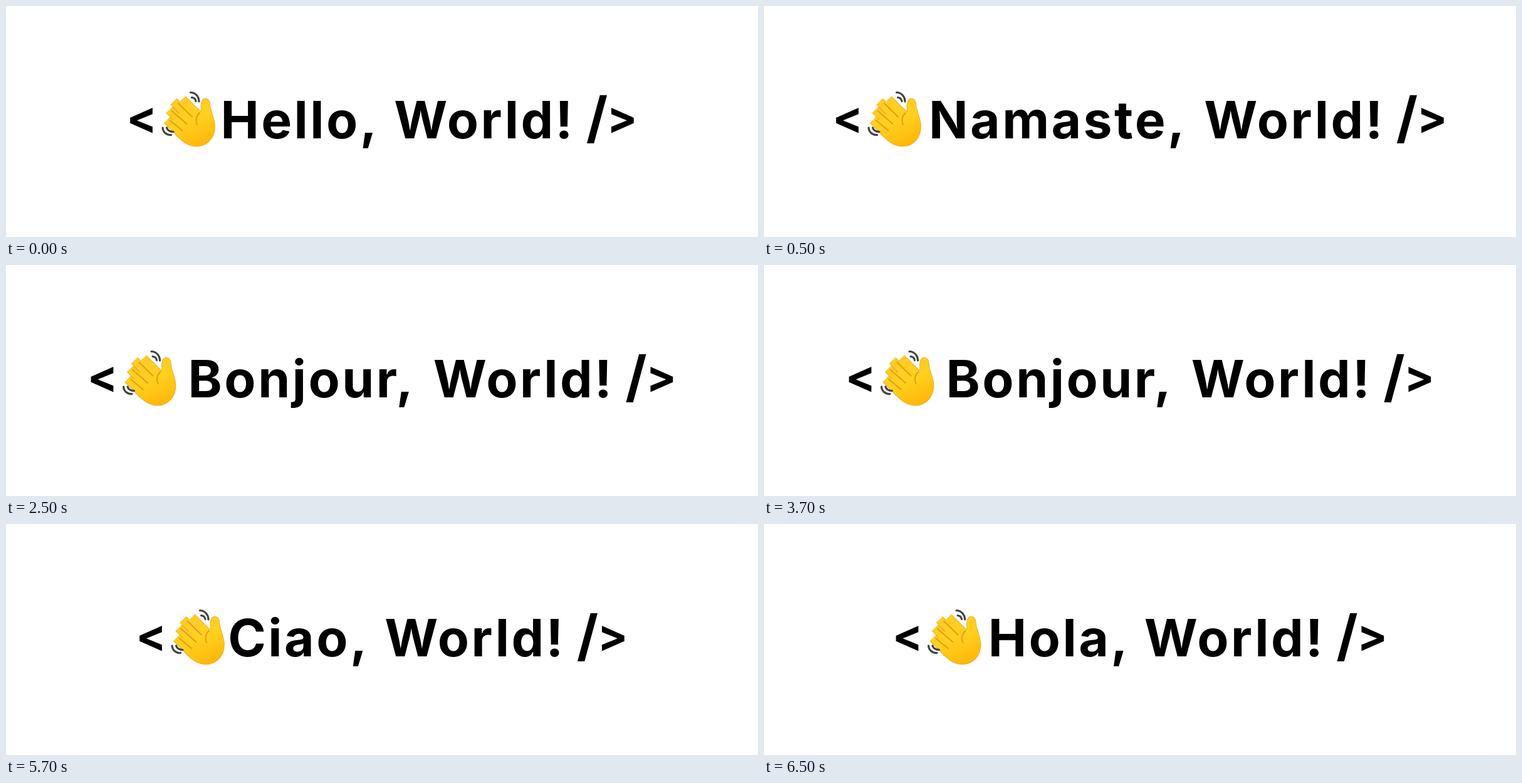
Write an HTML page that moves like this. It is 1200 px wide and 370 px high and loops after 8000 ms.

```html
<!DOCTYPE html>
<html lang="en">
<head>
<meta charset="utf-8">
<title>Hello, World!</title>
<style>
  html, body { margin: 0; width: 100%; height: 100%; overflow: hidden; background: #fff; }
  svg { display: block; width: 1200px; height: 370px; }
  text { font: 700 82px Inter, "Open Sans", sans-serif; text-anchor: middle; fill: #000; }
  .word { letter-spacing: 3.5px; font-optical-sizing: none; }
  .hand path { stroke-linecap: round; stroke-linejoin: round; fill: none; }
  .hand .palm { fill: url(#skin); }
  .hand .edge { stroke: #f0a31b; }
  .hand .crease { stroke: #e59a14; stroke-width: 1.8; }
  .hand .wave { stroke: #424242; stroke-width: 3.2; }
</style>
</head>
<body>
<svg viewBox="0 0 1200 370">
  <defs>
    <linearGradient id="skin" gradientUnits="userSpaceOnUse" x1="275" y1="142" x2="310" y2="225">
      <stop offset="0" stop-color="#ffca28"/>
      <stop offset=".5" stop-color="#ffd01f"/>
      <stop offset="1" stop-color="#ffb70a"/>
    </linearGradient>
    <path id="palm" d="M270 205C279 214 289 224.5 304 224.5C321 224.5 333 211 333 193C333 180 326 170 325.3 158C325 152 322 148.5 318.5 148.5C312 148.500 311 157 311.500 163C312 170 310 172 307 170L290 158L263 186Z"/>
    <path id="fingers" d="M281.500 149.500L308 176M267.500 153L298 184M260.500 166.500L290 196M257 182.500L285 210"/>
  </defs>

  <g id="head">
    <text id="open">&lt;</text>
    <g class="hand">
      <g class="edge">
        <use href="#palm" stroke-width="1.6"/>
        <use href="#fingers" stroke-width="14.400"/>
      </g>
      <use href="#fingers" stroke="url(#skin)" stroke-width="12.600"/>
      <use href="#palm" class="palm"/>
      <path class="crease" d="M275 156L297 177.500M264 167.500L288.500 189M261.500 183L281.500 199.500M309 171C303.500 176 302 183 305 190"/>
      <path class="wave" d="M294.500 138.500C302 138.500 308 145 308 153M296.500 146.500C300 147 302.500 149.500 303 152.500M250 195C250.500 202 256 207 263.500 206.500M256.500 195C257.500 198.500 261.500 201.500 267 201.500"/>
    </g>
  </g>
  <text id="greeting" class="word" y="212"></text>
  <g id="tail">
    <text class="word" x="763.5" y="212">World!</text>
    <text id="slash">/</text>
    <text id="close">&gt;</text>
  </g>
</svg>
<script>
  const $ = id => document.getElementById(id);
  const LOOP = 8000;

  // start ms, greeting, greeting centre, half width of the whole line
  const steps = [
    [0, "Hello,", 469, 404.5],
    [500, "Namaste,", 469, 487.5],
    [2500, "Bonjour,", 472, 467],
    [4500, "Ciao,", 467, 389.5],
    [6500, "Hola,", 471, 392]
  ];
  const BASE = steps[0][3];

  // Centre the ink of a symbol on a point, at a size giving the wanted height.
  const pen = document.createElement("canvas").getContext("2d");
  function placeSymbol(id, cx, cy, height) {
    const el = $(id);
    pen.font = '700 100px Inter, "Open Sans", sans-serif';
    pen.textAlign = "center";
    const m = pen.measureText(el.textContent);
    const up = m.actualBoundingBoxAscent, down = m.actualBoundingBoxDescent;
    const k = height / (up + down);
    el.style.fontSize = 100 * k + "px";
    el.setAttribute("x", cx + k * (m.actualBoundingBoxLeft - m.actualBoundingBoxRight) / 2);
    el.setAttribute("y", cy + k * (up - down) / 2);
  }
  placeSymbol("open", 216, 182.5, 41);
  placeSymbol("slash", 943, 181, 78);
  placeSymbol("close", 984, 182.5, 41);

  const shift = (id, dx) => $(id).setAttribute("transform", `translate(${dx})`);
  let shown;
  function draw(now) {
    const t = now % LOOP;
    const step = steps.findLast(s => t >= s[0]);
    if (step !== shown) {
      shown = step;
      const [, word, centre, half] = step;
      shift("head", BASE - half);
      shift("tail", half - BASE);
      $("greeting").textContent = word;
      $("greeting").setAttribute("x", centre);
    }
  }

  const start = performance.now();
  function tick() {
    draw(performance.now() - start);
    requestAnimationFrame(tick);
  }
  tick();
</script>
</body>
</html>
```
